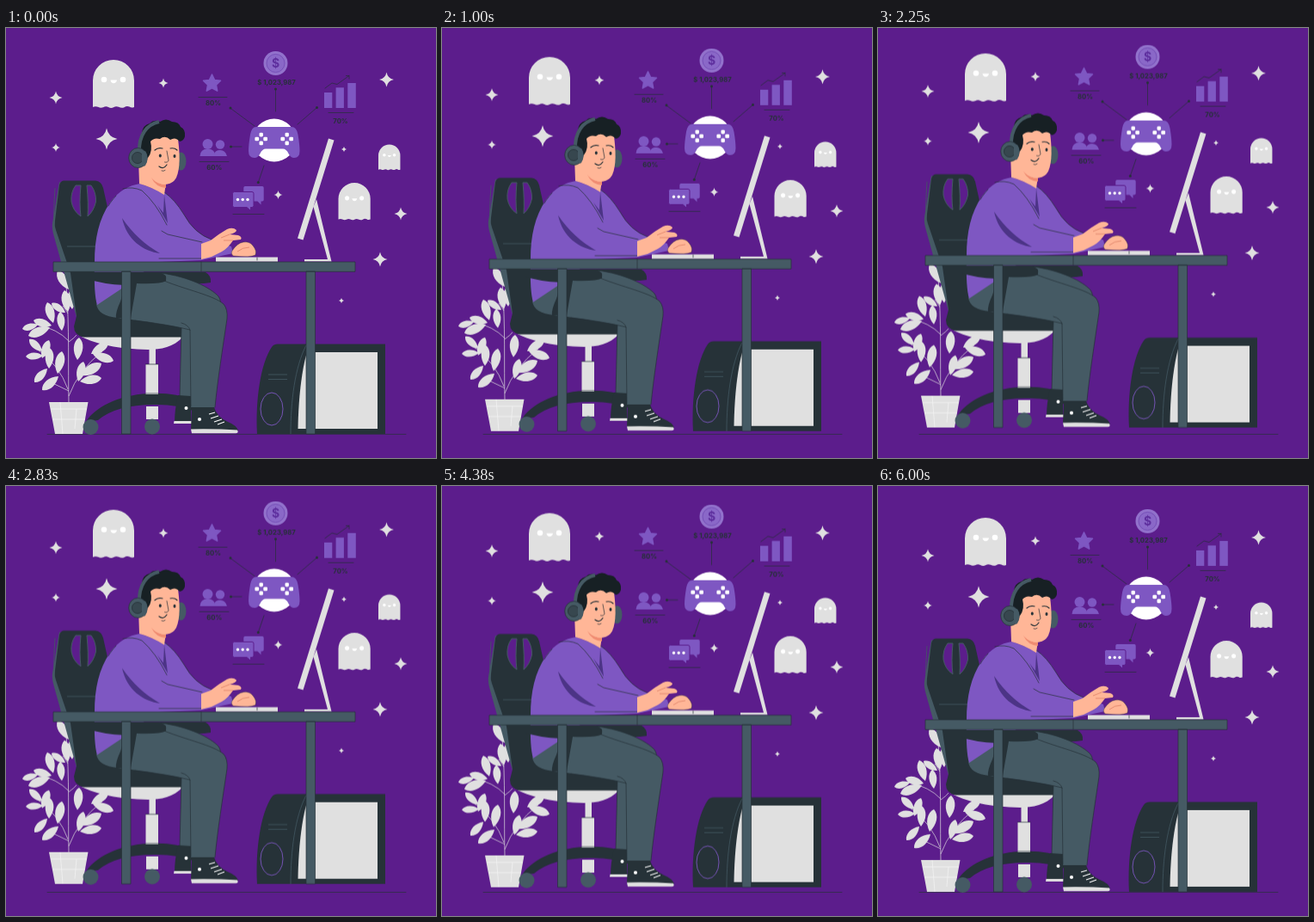
Write an HTML page that moves like this. It is 500 px wide and 500 px high and loops after 6.04 s.

```html
<!DOCTYPE html>
<html lang="en">
<head>
<meta charset="utf-8">
<title>Gamer at a desk</title>
<style>
  html, body { margin: 0; width: 100%; height: 100%; overflow: hidden; background: #5c1d8c; }
  svg { display: block; width: 100vw; height: 100vh; }
  #scene { animation: float 3020ms linear infinite alternate; }
  @keyframes float { to { transform: translateY(-10px); } }
  .dark { fill: #263238; }
  .mid { fill: #455a64; }
  .light { fill: #e0e0e0; }
  .purple { fill: #7e57c2; }
  .skin { fill: #ffb697; }
  .white { fill: #fff; }
  .ink { fill: none; stroke: #263238; stroke-width: .7; stroke-linecap: round; stroke-linejoin: round; }
  .edge { stroke: #263238; stroke-width: .7; }
  .stem { fill: none; stroke: #e0e0e0; stroke-width: .7; }
  .grey { fill: none; stroke: #455a64; stroke-width: .8; }
  text { font: 700 7.7px Inter, "Open Sans", sans-serif; fill: #263238; text-anchor: middle; }
</style>
</head>
<body>
<svg viewBox="0 0 500 500">
  <defs>
    <g id="ghost">
      <path class="light" d="M0 24a24 24 0 0 1 48 0V55q-3 1.400-5.500-.5q-3-1.500-6 .7q-3 1.500-6.500-.4q-3-1.500-6 .5q-3 1.500-6-.4q-3-1.500-6 .4q-3 1.200-6-.5q-3-1.200-6 .2z"/>
      <circle class="white" cx="13" cy="23" r="3.300"/>
      <circle class="white" cx="35" cy="23" r="3.300"/>
      <path class="white" d="M20.500 23.500h7.500q-.8 3.800-3.800 3.800t-3.700-3.800z"/>
    </g>
    <path id="spark" class="light" d="M0-1Q.16-.16 1 0Q.16.16 0 1Q-.16.16-1 0Q-.16-.16 0-1z"/>
    <g id="pad" class="white">
      <rect x="-2.200" y="-7.300" width="4.400" height="4.700" rx="1.300"/>
      <rect x="-2.200" y="2.600" width="4.400" height="4.700" rx="1.300"/>
      <rect x="-7.300" y="-2.200" width="4.700" height="4.400" rx="1.300"/>
      <rect x="2.600" y="-2.200" width="4.700" height="4.400" rx="1.300"/>
    </g>
  </defs>

  <path class="ink" d="M48 472.400H465"/>

  <g id="scene">
    <g id="sparks"></g>
    <use href="#ghost" transform="translate(101 37)"/>
    <use href="#ghost" transform="translate(433 135.500) scale(.53)"/>
    <use href="#ghost" transform="translate(386.500 180) scale(.775)"/>

    <!-- Icons -->
    <circle cx="313.500" cy="41" r="14" fill="#9272cc"/>
    <circle cx="313.500" cy="41" r="10.500" fill="#8a68c8" stroke="#7650b8"/>
    <text x="313.500" y="46" style="font-size:14px;fill:#5e2f9e">$</text>
    <text x="314.500" y="66.300">$ 1,023,987</text>

    <path class="purple" stroke="#7e57c2" stroke-width="1.500" stroke-linejoin="round" d="M239.500 54l3 6.400 7 .9-5.100 4.900 1.300 7-6.200-3.400-6.200 3.400 1.300-7-5.100-4.900 7-.9z"/>
    <text x="241" y="90.500">80%</text>

    <g class="purple">
      <circle cx="249" cy="135.500" r="5.200"/>
      <path d="M242 149v-2q1-5 7-5t8 7z"/>
      <circle cx="234.500" cy="135" r="6"/>
      <path d="M225.500 149q.5-8.500 9-8.500t9 8.500z"/>
      <rect x="370" y="75" width="9.300" height="18"/>
      <rect x="383.600" y="69.300" width="9.300" height="23.700"/>
      <rect x="397.300" y="64" width="9.500" height="29"/>
      <path d="M279 184h19q1.700 0 1.700 1.700v14q0 1.700-1.700 1.700h-1.500v4l-4-4h-14.500q-1.700 0-1.700-1.700v-14q0-1.700 1.700-1.700z"/>
      <path stroke="#5c1d8c" stroke-width="1" d="M265.500 190.500h20.500q2 0 2 2v14q0 2-2 2h-1.500v4l-4.500-4h-14.500q-2 0-2-2v-14q0-2 2-2z"/>
    </g>
    <g class="white">
      <circle cx="269.500" cy="199.500" r="1.700"/>
      <circle cx="275.200" cy="199.500" r="1.700"/>
      <circle cx="281" cy="199.500" r="1.700"/>
    </g>
    <text x="242.300" y="165">60%</text>
    <text x="389" y="111">70%</text>
    <path class="ink" d="M224 80.500H257M225 155.500H259M375 98.500H404M264 216.500H300M371 70L379 64L385 65.500L399 55.500M395.500 55.500H399V59M262 94L289 114M313.500 72V97M361 93L339 112M262 138H274M293.500 179L300 160"/>
    <g class="dark">
      <circle cx="261" cy="93" r="1.500"/><circle cx="313.500" cy="71" r="1.500"/>
      <circle cx="361.500" cy="92.500" r="1.500"/><circle cx="261.500" cy="138" r="1.500"/>
      <circle cx="293.300" cy="179.500" r="1.500"/>
    </g>

    <circle class="white" cx="311.800" cy="130.500" r="25"/>
    <path class="purple" d="M291 115H332Q338 115 339.500 124Q341.500 136 341.500 143Q341.500 151 335 151Q331 151 328.500 146Q326 140.500 322 140.500H302Q298 140.500 295.500 146Q293 151 289 151Q282 151 282 143Q282 136 284 124Q285.500 115 291 115z"/>
    <use href="#pad" x="296.700" y="129"/>
    <use href="#pad" x="326.700" y="129"/>

    <!-- Plant -->
    <path class="stem" d="M73 436C72 395 74 350 70 298M73 364Q60 350 36 345M72 420Q62 392 37 374M73 428Q84 398 112 376M73 365Q80 360 82 357M72 332L66 323M73 422L48 410"/>
    <g id="leaves" class="light"></g>
    <path class="light" d="M50 435H95.500L89 472H57z"/>
    <path fill="none" stroke="#f5f5f5" stroke-width=".7" d="M52 443H94M54 455H92M63 435L66 472M82 443L80 466"/>

    <!-- Chair -->
    <path class="dark" d="M93 458C102 442 130 427 165 425Q196 423 217 433V445Q196 437 172 438Q128 438 107 456z"/>
    <path class="light" d="M166.500 372H174V391H177V426H162.500V391H166.500zM163 440H177V455H163z"/>
    <path class="ink" d="M162.500 391H177M162.500 425H177"/>
    <circle class="mid" cx="98.500" cy="464" r="9"/>
    <circle class="mid" cx="170" cy="463.500" r="9"/>
    <path class="light" d="M88 359H206C195 371 180 374 165 374C130 373 106 368 88 359z"/>
    <path class="mid" d="M62 179L54 227Q53 233 56 243L76 315L83 340L92 338L64 236L67 182z"/>
    <path class="dark" d="M67 177.500H104Q111 178 113 186L121 222L150 300L160 335L214 349V359.500H90Q79 357 79 347L82 335L75 285L58 235Q56 230 57 224L62 183Q63 178 67 177.500z"/>
    <path fill="#5c1d8c" stroke="#455a64" d="M81 183Q75 191 76 202Q78 213 87 219Q85 204 87 183zM99 183Q105 191 104.500 202Q102 213 95 219Q96 204 94 183z"/>
    <path class="grey" d="M71 254H105M57 186Q55 215 56 232L68 272"/>
    <path class="dark" d="M178 284H232Q239 288 238 296Q215 300 180 292z"/>

    <!-- Legs -->
    <path class="mid edge" d="M204 348L202 429H216V348z"/>
    <path class="dark" d="M200 427L215 428V459H196Q196 444 200 427z"/>
    <path class="light" d="M195.500 457H216V460H195z"/>
    <circle class="white" cx="209.500" cy="442" r="2"/>
    <path class="mid edge" d="M180 285C212 289 238 302 247 312Q251 318 248 322L176 303z"/>
    <path class="mid" d="M150 294H184C208 304 242 311 253 321Q258 327 257 338C252 372 246 410 243 441H215L214 351C196 346 160 341 130 337Q107 335 105 321Q124 305 150 294z"/>
    <path class="ink" d="M184 294C208 304 242 311 253 321Q258 327 257 338C252 372 246 410 243 441M215 440L214 351Q190 345 150 340M214 351Q212 345 204 343"/>
    <path class="dark" d="M216 441H242Q245 452 258 458Q268 462 270 468H215z"/>
    <path class="light" d="M215 466.500Q245 466 269 467.500Q271 471 267 471.300H216z"/>
    <circle class="white" cx="225" cy="455" r="2.100"/>
    <path fill="none" stroke="#fff" stroke-width="1.100" d="M236 449L243 447M238 454L247 451M242 458L251 455M246 461L254 458"/>

    <!-- Body -->
    <path class="purple" d="M156 181Q171 187 184 191Q196 199 207 217Q219 239 239 246L262 254L264 262L227 270L178 272L150 290L133 304L106 322Q102 310 103 272C103 245 108 222 121 203C131 189 143 183 156 181z"/>
    <path fill="#4c3486" d="M135 221C147 239 162 252 179 262C160 260 140 246 135 221zM184 194L188 227Q182 217 176 206L183 215z"/>
    <path class="ink" d="M136 187Q147 184 158 189Q174 203 187 229M181 236L188 240L228 249M178 268H227M184 191Q196 199 207 217Q219 239 239 246M128 195Q121 203 119 207"/>

    <!-- Head -->
    <ellipse class="mid" cx="203.500" cy="155" rx="6" ry="10.500"/>
    <path class="skin" d="M154 152L155 181Q170 185 184 194L186 180z"/>
    <path fill="#f08c72" d="M169 174Q176 182 186 182L186 186Q174 185 169 174z"/>
    <path class="skin" d="M164 130Q182 119 200 129C202 145 203 163 198 174C193 184 179 184 171 176Q160 165 160 150z"/>
    <path fill="#172024" d="M158 146Q152 132 158 122Q159 113 167 111Q172 106 179 109Q186 104 193 109Q201 109 203 115Q209 118 208 126Q207 131 202 132Q197 126 191 130Q185 124 179 129Q172 127 168 132Q171 143 165 151L160 151z"/>
    <path fill="none" stroke="#455a64" stroke-width="4" d="M155 145C154 124 164 112 178 109"/>
    <ellipse class="mid edge" cx="153.500" cy="151" rx="10.800" ry="11.500"/>
    <circle cx="153" cy="151" r="6.500" fill="#37474f" stroke="#263238" stroke-width=".8"/>
    <path class="mid" d="M162 143Q167 151 162 160Q159 162 158 158V145z"/>
    <g class="dark">
      <ellipse cx="179.300" cy="148.500" rx="1.500" ry="2"/>
      <ellipse cx="196" cy="149" rx="1.500" ry="2"/>
    </g>
    <path class="ink" style="stroke-width:1.200" d="M173 142Q177 138.500 182 140M191 140Q196 139 199 142M178 161Q183 165 187 159"/>
    <path class="ink" d="M187 143L189 154Q188 157 184.500 156M181 166Q183 167 185 165.500"/>

    <!-- Hands -->
    <path class="skin edge" style="stroke-width:.4" d="M263 259Q269 250 276 249Q283 248 287 253Q292 259 290 264Q284 267 264 265Q261 262 263 259z"/>
    <path class="skin" d="M227 251L238 247Q248 239 257 234Q264 231 268 235Q268 238 260 240L270 241Q275 243 273 246L264 247Q258 256 251 260L239 266L227 269z"/>
    <path fill="none" stroke="#d97a62" stroke-width=".7" d="M250 244L260 240M253 247L264 247M269 260Q275 255 283 255"/>

    <!-- Computer -->
    <path class="dark" d="M292 472C290 432 296 390 309 371Q311 367.500 316 367.500H441V472z"/>
    <path class="light" d="M339.500 466C340 430 344 397 350 377H432V466z"/>
    <path class="grey" d="M331 472C331 434 336 394 349 369M305 403H327M305 408.500H327"/>
    <ellipse cx="309" cy="443" rx="13" ry="19" fill="none" stroke="#7e57c2" stroke-width=".9"/>

    <!-- Armrest -->
    <path class="dark" d="M92 284H178Q188 286 186 294Q180 298 152 297L145 337H128Q127 331 133 318L139 299Q112 298 92 291z"/>

    <!-- Desk -->
    <path class="light" d="M375 128.500L381.500 130.500L345.500 246.500L339 244.500zM361 199L378.500 271.500H347V269H374L357.500 208z"/>
    <path class="light" d="M244 266.500H316V271.800H244z"/>
    <path class="ink" d="M292 267V270"/>
    <path class="mid edge" d="M134.500 283H145V472H134.500zM349 283H359.500V472H349zM55 272H406V283.300H55z"/>
    <path class="ink" d="M227 272V283"/>
  </g>
</svg>
<script>
  const fill = (id, html) => { document.getElementById(id).innerHTML = html; };

  // x, y, radius
  const sparks = [
    [58, 81, 7.5], [183, 64, 5.5], [117, 129, 12.5], [58, 139, 5], [442.5, 60, 8.5],
    [393, 141, 3], [316.5, 194, 5], [459, 216, 7.5], [435, 269, 8.5], [390, 317, 3]
  ];
  fill('sparks', sparks.map(([x, y, r]) =>
    `<use href="#spark" transform="translate(${x} ${y}) scale(${r})"/>`).join(''));

  // base x, base y, tip x, tip y
  const leaves = [
    [73, 304, 60, 282], [72, 330, 68, 305], [69, 331, 53, 320], [55, 343, 48, 319],
    [65, 352, 63, 330], [53, 346, 32, 340], [37, 345, 19, 350], [51, 348, 26, 358],
    [42, 376, 27, 362], [43, 381, 23, 382], [42, 384, 50, 363], [50, 396, 51, 372],
    [60, 402, 65, 376], [48, 396, 33, 412], [61, 405, 42, 421], [77, 327, 76, 304],
    [83, 386, 85, 360], [99, 379, 119, 366], [101, 379, 125, 387], [84, 411, 90, 388],
    [87, 404, 111, 390], [86, 411, 111, 407]
  ];
  const leaf = ([x, y, u, v]) => {
    const dx = u - x, dy = v - y;
    const side = s => [.35, .8].map(k => `${x + dx * k - dy * s} ${y + dy * k + dx * s}`);
    const [a, b] = side(.27), [c, d] = side(-.27);
    return `M${x} ${y}C${a} ${b} ${u} ${v}C${d} ${c} ${x} ${y}z`;
  };
  fill('leaves', `<path d="${leaves.map(leaf).join('')}"/>`);
</script>
</body>
</html>
```
